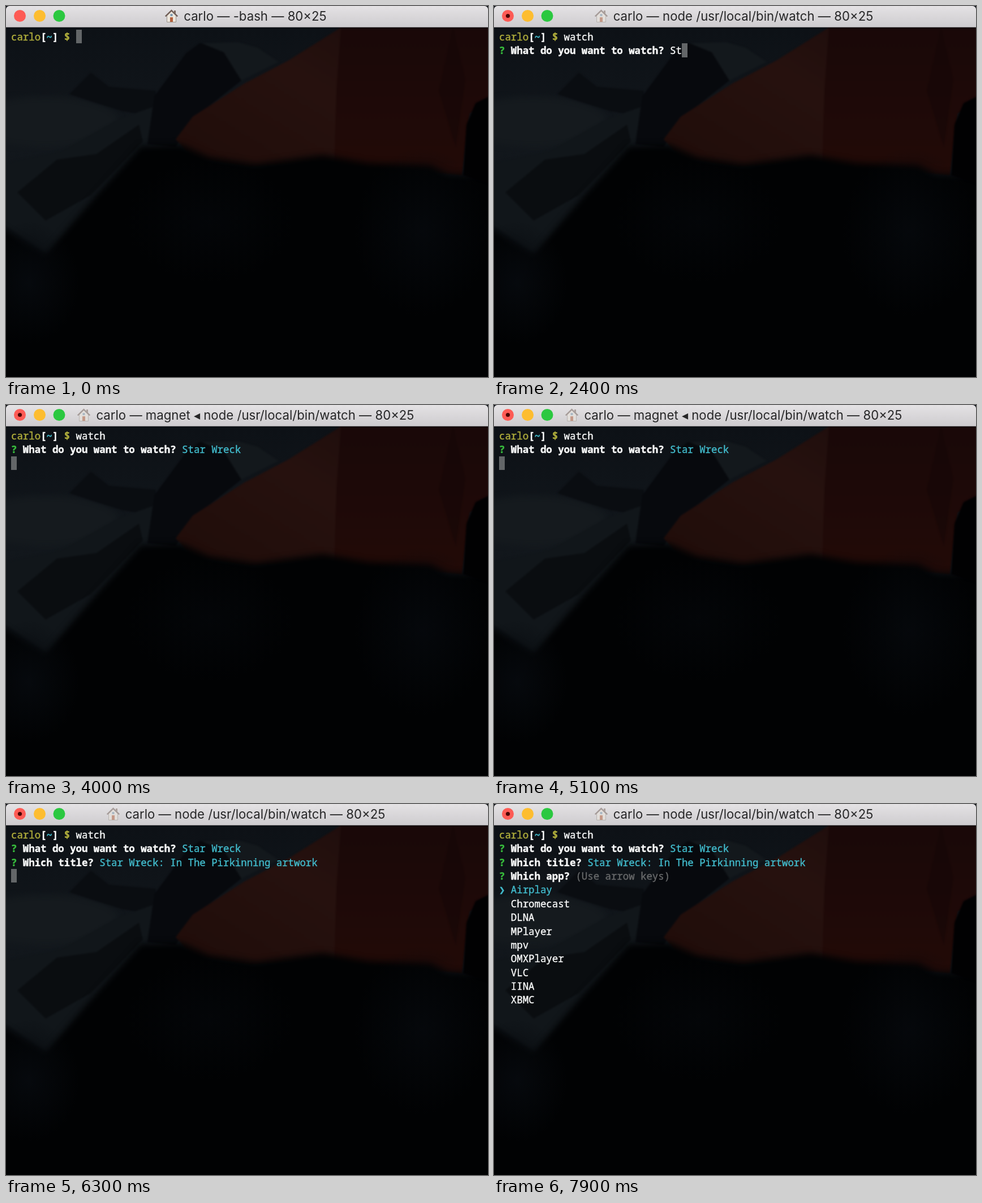
These frames come from a looping animation (852 by 657 pixels, 8000 ms). An HTML page:

```html
<!DOCTYPE html>
<html lang="en">
<head>
<meta charset="utf-8">
<title>Terminal</title>
<style>
html, body { margin: 0; width: 852px; height: 657px; overflow: hidden; background: #000; }
svg { display: block; }
#scene { position: absolute; left: 0; top: 0; }
#bar {
  position: absolute; left: 0; top: 0; width: 852px; height: 38px; box-sizing: border-box;
  background: linear-gradient(#e4e2e4, #cecccf); border-bottom: 1px solid #8f8d90;
  border-radius: 6px 6px 0 0;
}
#lights { position: absolute; left: 0; top: 0; }
#head {
  position: absolute; left: 0; top: 0; width: 848px; height: 36px;
  display: flex; justify-content: center; align-items: center; gap: 10px;
  font: 22.2px/36px Inter, "DejaVu Sans", sans-serif; color: #262627; white-space: pre;
}
#screen {
  position: absolute; left: 9px; top: 42px; color: #fafbfb;
  font: 500 17.38px/24.37px "Noto Sans Mono", "DejaVu Sans Mono", monospace;
  font-variant-ligatures: none; -webkit-text-stroke: .4px;
}
#screen div { height: 24.37px; white-space: pre; }
.yellow { color: #b2b03c; }
.cyan { color: #42bccd; }
.green { color: #38bd3d; }
.gray { color: #686a6b; }
b { font-weight: 800; }
.cursor { display: inline-block; width: 10.4px; height: 24.37px; background: #636668; vertical-align: top; }
</style>
</head>
<body>
<svg id="scene" width="852" height="657" color-interpolation-filters="sRGB">
  <defs>
    <linearGradient id="sky" x2="0" y2="1">
      <stop offset="0" stop-color="#0c1015"/><stop offset=".55" stop-color="#12171c"/><stop offset="1" stop-color="#0c1014"/>
    </linearGradient>
    <linearGradient id="slope" x1="0" y1="1" x2="1" y2="0">
      <stop offset="0" stop-color="#1f0c09"/><stop offset=".6" stop-color="#26110e"/><stop offset="1" stop-color="#1c0c0b"/>
    </linearGradient>
    <linearGradient id="cliff" x2="0" y2="1">
      <stop offset="0" stop-color="#190808"/><stop offset="1" stop-color="#220a07"/>
    </linearGradient>
    <radialGradient id="haze"><stop stop-color="#06090d"/><stop offset="1" stop-color="#06090d" stop-opacity="0"/></radialGradient>
    <filter id="soft"><feGaussianBlur stdDeviation="1.5"/></filter>
    <filter id="softer" x="-10%" y="-10%" width="120%" height="120%"><feGaussianBlur stdDeviation="6"/></filter>
  </defs>
  <rect width="852" height="460" fill="url(#sky)"/>
  <ellipse cx="70" cy="205" rx="130" ry="45" fill="#151a1e" filter="url(#softer)"/>
  <g filter="url(#soft)">
    <path fill="#0a0d11" d="M112 156 150 118 182 143 265 150 262 196 205 186 160 172Z"/>
    <path fill="#11161a" d="M0 278 100 256 195 202 262 178 250 240 160 340 72 440 0 390Z"/>
    <path fill="#0a0d10" d="M20 330 90 272 160 262 235 210 242 240 150 335 70 380Z"/>
    <path fill="#07090d" d="M250 245 262 160 318 84 342 66 385 68 416 132 330 200 300 250Z"/>
    <path fill="#13181c" d="M346 66 410 64 445 74 482 99 416 132 385 82Z"/>
    <path fill="url(#slope)" d="M300 236 330 196 420 138 500 96 592 38H700V285L600 275 430 285 330 270Z"/>
    <path fill="url(#cliff)" d="M592 38H870V170L820 190 806 300 750 295 580 285 584 150Z"/>
    <path fill="#150606" d="M790 38 812 130 795 250 765 150Z" opacity=".5"/>
  </g>
  <path fill="#010203" filter="url(#softer)" d="M-20 385 70 440 160 335 238 248 310 246 360 268 440 280 560 264 640 278 750 282 780 298 820 300 880 300V680H-20Z"/>
  <path fill="#010102" filter="url(#soft)" d="M808 300 814 210 830 172 870 152V320Z"/>
  <ellipse cx="40" cy="490" rx="90" ry="110" fill="url(#haze)"/>
  <ellipse cx="735" cy="400" rx="120" ry="150" fill="url(#haze)" opacity=".8"/>
  <ellipse cx="360" cy="380" rx="150" ry="110" fill="url(#haze)" opacity=".5"/>
</svg>

<div id="bar">
  <svg id="lights" width="120" height="36">
    <circle cx="24.5" cy="17.5" r="10.5" fill="#fd5b55"/>
    <circle cx="59.5" cy="17.5" r="10.5" fill="#fdbd30"/>
    <circle cx="94" cy="17.5" r="10.5" fill="#2bc840"/>
    <circle id="dot" cx="24.5" cy="17.5" r="3.6" fill="#4a0503"/>
  </svg>
  <div id="head">
    <svg id="home" width="23" height="24" viewBox="0 0 23 24">
      <path fill="#ece6dc" stroke="#9a948c" d="M3.5 11 11.5 3 19.5 11V22.5H3.5Z"/>
      <path fill="#7d6a60" d="M16 2h3v6l-3-3Z"/>
      <path fill="none" stroke="#715f58" stroke-width="2.4" d="M.8 12.5 11.5 2 22.2 12.5"/>
      <path fill="#b4603c" d="M9 14h5v8H9Z"/>
      <path fill="#7d9bb0" d="M9.5 8h4v4h-4Z"/>
    </svg>
    <span id="title"></span>
  </div>
</div>
<div id="screen"></div>

<script>
const LOOP = 8000, USER = "carlo", QUERY = "Star Wreck";
const TITLES = [
  "Star.Wreck.In.The.Pirkinning.2005.DVDRip.XviD.AC-3.velTrick",
  "Star Wreck: In The Pirkinning artwork",
  "star_wreck_ithe_pirkinning_subtitled_xvid.avi",
  "Star Wreck 4 1/2: Weak Performance DVD image",
  "Star Wreck - In The Pirkinning [iPhoneReady].mp4",
  "Star Wreck: In The Pirkinning",
  "Star Wreck VI - In the Pirkinning",
  "star_wreck_in_the_pirkinning_subtitled_xvid.avi",
  "Star.Wreck.2005.DVDRip-Keldin(SweSub)",
  "Energia Productions Ltd_  - Star Wreck - Legacy"
];
const APPS = ["Airplay", "Chromecast", "DLNA", "MPlayer", "mpv", "OMXPlayer", "VLC", "IINA", "XBMC"];

// Moments of each step, in ms
const AT = { type: 200, run: 1100, node: 1400, ask: 1700, query: 2250, search: 4000,
  pick: 5300, down: 6000, chosen: 6200, fetch: 6500, apps: 7600 };

const $ = id => document.getElementById(id);
const tint = (name, text) => `<span class="${name}">${text}</span>`;
const bold = text => `<b>${text}</b>`;
const cursor = '<span class="cursor"></span>';
const typed = (text, t, start, step) =>
  text.slice(0, Math.max(0, Math.floor((t - start) / step) + 1));
const question = (text, answer) => `${tint("green", bold("?"))} ${bold(text)} ${answer}`;
const menu = (items, picked) =>
  items.map((item, i) => i === picked ? tint("cyan", "❯ " + item) : "  " + item);
const hint = tint("gray", "(Use arrow keys)");

function screenRows(t) {
  const rows = [tint("yellow", USER) + bold("[") + tint("cyan", bold("~")) + bold("]") +
    ` ${tint("yellow", bold("$"))} `];
  if (t < AT.run) {
    rows[0] += typed("watch", t, AT.type, 150) + cursor;
    return rows;
  }
  rows[0] += "watch";
  if (t < AT.ask) return [...rows, cursor];

  const done = t >= AT.search;
  rows.push(question("What do you want to watch?",
    done ? tint("cyan", QUERY) : typed(QUERY, t, AT.query, 150) + cursor));
  if (!done) return rows;
  if (t < AT.pick) return [...rows, cursor];

  if (t < AT.chosen) {
    const moved = t >= AT.down;
    return [...rows, question("Which title?", moved ? "" : hint), ...menu(TITLES, moved ? 1 : 0)];
  }
  rows.push(question("Which title?", tint("cyan", TITLES[1])));
  if (t < AT.apps) return [...rows, cursor];
  return [...rows, question("Which app?", hint), ...menu(APPS, 0)];
}

function jobName(t) {
  if (t < AT.node) return "-bash";
  const magnet = t >= AT.search && t < AT.pick || t >= AT.fetch && t < AT.apps;
  return (magnet ? "magnet ◂ " : "") + "node /usr/local/bin/watch";
}

let shown;
function draw(now) {
  const t = now % LOOP, busy = t >= AT.node;
  const html = screenRows(t).map(row => `<div>${row}</div>`).join("");
  const title = `${USER} — ${jobName(t)} — 80×25`;
  if (html + title !== shown) {
    shown = html + title;
    $("screen").innerHTML = html;
    $("title").textContent = title;
    $("dot").style.opacity = busy ? 1 : 0;
    $("home").style.opacity = busy ? .5 : 1;
  }
  requestAnimationFrame(draw);
}
draw(performance.now());
</script>
</body>
</html>
```
